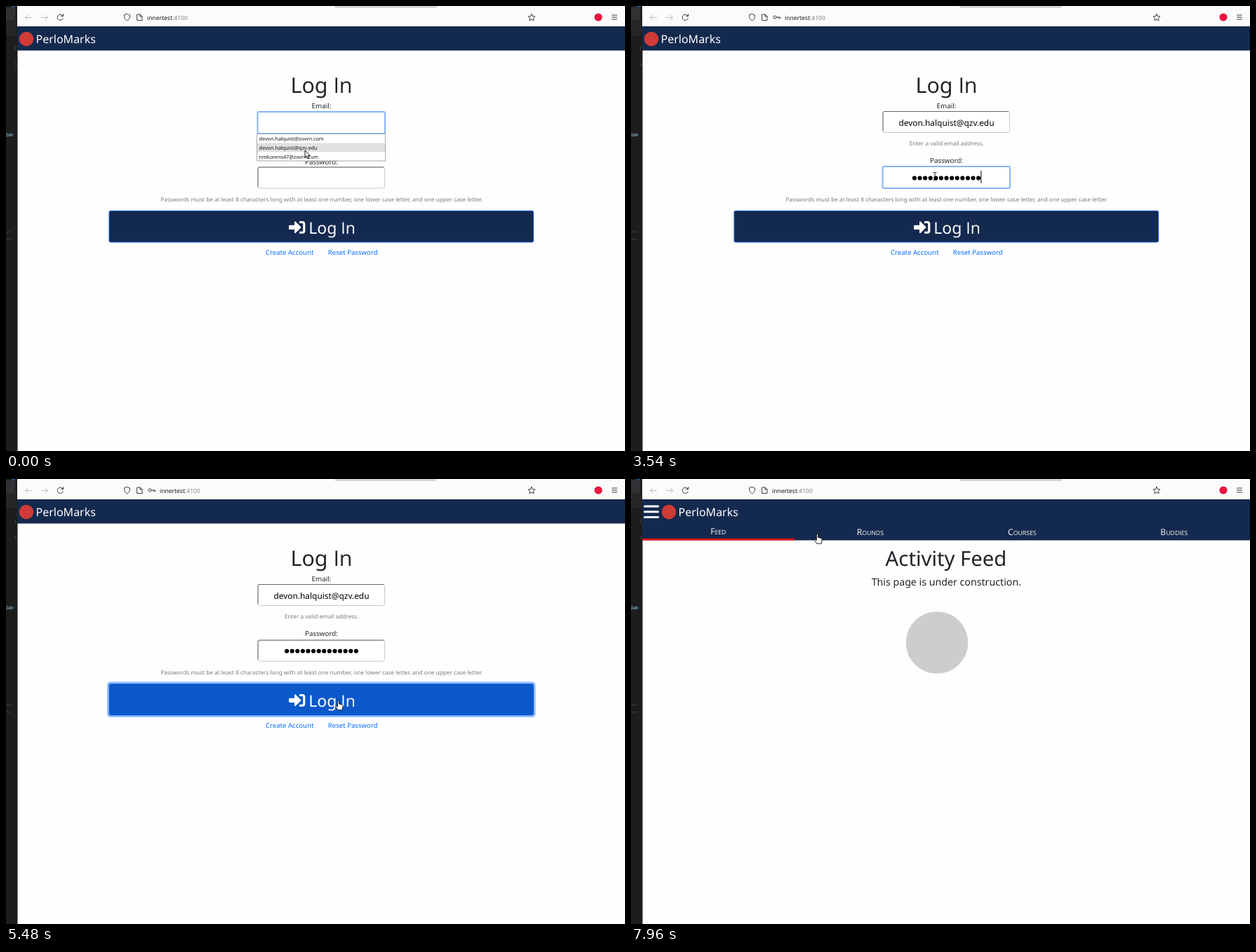
Animation, 882 px wide and 635 px high, one loop 8000 ms. Source, as an HTML page:

```html
<!DOCTYPE html>
<html lang="en">
<head>
<meta charset="utf-8">
<title>Log in</title>
<style>
  html, body { margin: 0; width: 100%; height: 100%; overflow: hidden; background: #fefefe; }
  svg { display: block; }
  text { font-family: "Noto Sans", "Open Sans", sans-serif; fill: #212529; text-rendering: geometricPrecision; }
  .mid { text-anchor: middle; }
  .caps, .open { font-family: "Open Sans", "Noto Sans", sans-serif; }
  .caps { font-size: 12.2px; fill: #fff; text-anchor: middle; }
  .caps tspan { font-size: 8.7px; }
  .h1 { font-size: 30.4px; }
  .label { font-size: 9.8px; }
  .help { font-size: 8.23px; fill: #747c84; }
  .value { font-size: 11.9px; fill: #000; }
  .link { font-size: 9.6px; fill: #0d6efd; }
  .brand { font-size: 16px; fill: #fff; }
  .url { font-size: 8.5px; fill: #15141a; }
  .ui { font-size: 7.25px; fill: #15141a; }
  .key { text-decoration: underline; }
  .navy { fill: #14294e; }
  .line { fill: none; stroke: #3b3b42; stroke-width: 1; stroke-linecap: round; stroke-linejoin: round; }
  .dots { fill: none; stroke: #000; stroke-linecap: round; }
  .pointer { fill: #fff; stroke: #000; stroke-width: .9; stroke-linejoin: round; }
</style>
</head>
<body>
<svg width="882" height="635" viewBox="0 0 882 635">
  <rect width="882" height="635" fill="#fefefe"/>

  <!-- editor edge behind the browser -->
  <rect width="16.5" height="635" fill="#1d1d1d"/>
  <rect y="2" width="13" height="18" fill="#313134"/>
  <rect y="20" width="15" height="22" fill="#262627"/>
  <rect x="8" width="5" height="1.5" fill="#2a5fb0"/>
  <path d="M13.5 57V63M13.5 81V84H16M0 322.5H8M0 332.5H8" fill="none" stroke="#4a4a4a" stroke-width=".8"/>
  <text x="-1" y="186" font-size="8" style="fill:#9cdcfe">oa‹</text>

  <!-- toolbar -->
  <rect x="16" width="866" height="29" fill="#fbfbfc"/>
  <path d="M468.500 0H614V1Q614 3 612 3H470.500Q468.500 3 468.500 1Z" fill="#d6d6d8"/>
  <g class="line">
    <path d="M36.500 16.500H27.500M31 13L27.500 16.500L31 20M50.500 16.500H59.500M56 13L59.500 16.500L56 20" stroke="#bcbcc0"/>
    <path d="M81 14A4.200 4.200 0 1 0 81.300 18M81.700 11.500V14.500H78.700"/>
    <path d="M172.500 11.500L176.500 13Q177 18.500 172.500 21Q168 18.500 168.500 13Z"/>
    <path d="M187 12H191L194 15V20.500H187ZM191 12V15H194"/>
    <path d="M749 11.300L750.500 14.500L754 14.900L751.400 17.200L752.100 20.700L749 19L745.900 20.700L746.600 17.200L744 14.900L747.500 14.500Z"/>
    <path d="M863.500 13H870.500M863.500 16H870.500M863.500 19H870.500"/>
  </g>
  <circle cx="844" cy="16" r="5.600" fill="#e9153f"/>
  <g id="keyIcon">
    <rect id="keyBack" x="199" y="7" width="18" height="18" rx="2" fill="#d4d4dc"/>
    <path class="line" d="M207.200 16A2.100 2.100 0 1 0 203 16A2.100 2.100 0 1 0 207.200 16H212.500V18M210.500 16V17.500"/>
  </g>
  <text id="url" class="url" x="201" y="19.500">innertest<tspan fill="#85858c">:4100</tspan></text>

  <g id="login">
    <rect class="navy" x="16" y="29" width="866" height="34.500"/>
    <circle cx="29" cy="47" r="10.300" fill="#cf3b36"/>
    <text class="brand" x="42.500" y="53">PerloMarks</text>
    <text class="h1 mid" x="449.500" y="124">Log <tspan class="open">In</tspan></text>
    <text class="label mid" x="449.500" y="146">Email:</text>
    <g id="email"></g>
    <text id="emailValue" class="value mid" x="449.500" y="170.500">devon.halquist@qzv.edu</text>
    <text id="emailHelp" class="help mid" x="449.500" y="199">Enter a valid email address.</text>
    <text id="passLabel" class="label mid" x="449.500" y="224">Password:</text>
    <g id="pass"></g>
    <path id="passDots" class="dots" stroke-width="6.200" stroke-dasharray="0 7.600"/>
    <text class="help mid" x="449.500" y="278.500">Passwords must be at least 8 characters long with at least one number, one lower case letter, and one upper case letter.</text>
    <rect id="ring" x="145.200" y="290.500" width="608.100" height="48.300" rx="3.500" fill="none" stroke="#98c1fe" stroke-width="2.600"/>
    <rect id="submit" x="147" y="292.300" width="604.500" height="44.700" rx="2" stroke="#0d5fd9"/>
    <path d="M404 312.700H411V308.300Q411 306.500 412.500 307.600L420 315Q420.700 315.800 420 316.600L412.500 324Q411 325 411 323.300V319H404Q403 319 403 318V313.700Q403 312.700 404 312.700ZM418 307H422.500Q426.300 307 426.300 310.800V321Q426.300 324.800 422.500 324.800H418V321.800H422Q423.200 321.800 423.200 320.600V311.200Q423.200 310 422 310H418Z" fill="#fff"/>
    <text x="431.200" y="324.500" font-size="23" style="fill:#fff">Log <tspan class="open">In</tspan></text>
    <text class="link mid" x="404.200" y="354.700">Create Account</text>
    <text class="link mid" x="494.200" y="354.700">Reset Password</text>
    <g id="list">
      <rect x="357.500" y="182.500" width="183" height="38.500" fill="#fff" stroke="#a9a9ad"/>
      <rect x="358" y="195.500" width="182" height="12.800" fill="#e0e0e1"/>
      <text class="ui" x="360.500" y="192">devon.halquist@zovrn.com</text>
      <text class="ui" x="360.500" y="204.800">devon.halquist@qzv.edu</text>
      <text class="ui" x="360.500" y="217.600">nmkorens47@zovrn.com</text>
    </g>
    <rect id="caret" width="1" height="18"/>
  </g>

  <g id="feed">
    <rect class="navy" x="16" y="29" width="866" height="58.500"/>
    <path d="M19.500 39H38.500M19.500 46.700H38.500M19.500 54.400H38.500" stroke="#fff" stroke-width="3" stroke-linecap="round"/>
    <circle cx="54" cy="47" r="10.300" fill="#cf3b36"/>
    <text class="brand" x="67.500" y="53">PerloMarks</text>
    <g id="tabs"></g>
    <rect x="16" y="85" width="217" height="2.500" fill="#fa0f14"/>
    <text class="mid" x="449" y="123.500" font-size="29.300">Activity Feed</text>
    <text class="mid" x="449.300" y="152" font-size="14.200">This page is under construction.</text>
    <circle cx="436" cy="233.500" r="44.300" fill="#cdcdcd"/>
  </g>

  <g id="popup">
    <rect id="shadow" x="199.500" y="24.500" width="238.500" height="173" rx="3" fill="#000" opacity=".1"/>
    <rect x="200.500" y="25" width="236.500" height="171" rx="3" fill="#fff"/>
    <text class="ui" x="210.700" y="43.800" style="font-size:6.900px;font-weight:700">Save login for http://innertest:4100?</text>
    <text class="ui" x="210.500" y="66.500">Username</text>
    <text class="ui" x="210.500" y="110.700">Password</text>
    <g fill="#fff" stroke="#8f8f9d">
      <rect x="211.500" y="71.500" width="215" height="19.500" rx="2"/>
      <rect x="211.500" y="116" width="215" height="19.500" rx="2"/>
      <rect x="211.500" y="147" width="9.500" height="9.500" rx="1.500" fill="#f0f0f4"/>
    </g>
    <text class="ui" x="216" y="84">devon.halquist@qzv.edu</text>
    <path class="line" d="M413 80.500L415.500 83L418 80.500"/>
    <path class="dots" d="M218.300 126.500H277.800" stroke-width="3.500" stroke-dasharray="0 4.570"/>
    <text class="ui" x="224.700" y="154.700" style="fill:#4b4b53">S<tspan class="key">h</tspan>ow password</text>
    <g id="buttons" fill="#f0f0f4">
      <rect x="309" y="166" width="36" height="20" rx="2"/>
      <rect id="decline" x="350" y="166" width="56" height="20" rx="2"/>
      <rect x="406.700" y="166" width="20.300" height="20" rx="2"/>
    </g>
    <text class="ui mid" x="327" y="178.700"><tspan class="key">S</tspan>ave</text>
    <text class="ui mid" x="378" y="178.700"><tspan class="key">D</tspan>on't save</text>
    <path class="line" d="M413.200 174L416.800 177.500L420.400 174"/>
  </g>

  <g id="cursor">
    <path id="arrow" class="pointer" d="M0 0V10.200L2.400 8L4 11.700L5.700 11L4.200 7.400H7.200Z"/>
    <path id="beam" d="M-2.500 -5.500H-.6L0 -5L.6 -5.500H2.500M0 -5V5M-2.500 5.500H-.6L0 5L.6 5.500H2.500" fill="none" stroke="#222"/>
    <path id="hand" class="pointer" d="M-1.100 .9Q0 -.6 1.100 .9V5L3.400 5.300L6 6.200Q6.900 6.700 6.700 8L5.600 13.700H-.6L-3.900 9Q-4.300 7.700 -3 7.700L-1.100 9Z"/>
  </g>
</svg>
<script>
  const LOOP = 8000;
  const $ = id => document.getElementById(id);
  const show = (id, on) => $(id).setAttribute('visibility', on ? 'inherit' : 'hidden');
  const set = (id, attrs) => { for (const k in attrs) $(id).setAttribute(k, attrs[k]); };
  const within = (t, a, b) => t >= a && t < b;

  // last row whose time has passed
  const at = (rows, t) => rows.filter(r => r[0] <= t).pop();

  const FILL = 720, TO_PASS = 1020, PRESS = 5360, LOGGED_IN = 5490;

  const CURSOR = [
    [0, 'arrow', 426, 206], [870, 'arrow', 429, 222], [1020, 'beam', 435, 243], [1420, 'beam', 433, 243],
    [4720, 'beam', 440, 239], [4840, 'arrow', 464, 265], [4960, 'hand', 479.5, 294.5],
    [5080, 'hand', 473.5, 316], [5490, 'arrow', 473.5, 316],
    [6220, 'arrow', 466, 303], [6360, 'arrow', 438, 258], [6490, 'arrow', 402, 208],
    [6630, 'arrow', 380, 181], [6760, 'arrow', 373.5, 173.5],
    [7050, 'arrow', 372, 158], [7180, 'arrow', 364, 98], [7300, 'arrow', 304, 93],
    [7430, 'arrow', 230, 89], [7560, 'hand', 197.5, 86], [7700, 'hand', 206, 83],
    [7830, 'hand', 237, 80], [7960, 'hand', 265.5, 78.5]
  ];
  const TYPED = [
    [0, 0], [2140, 1], [2420, 2], [2560, 4], [2700, 5], [2840, 7], [2980, 8],
    [3120, 10], [3260, 12], [3540, 13], [3830, 14]
  ];
  const POPUP = [[0, 0], [5630, .5], [5750, 1], [7050, .5], [7180, 0]];
  const CARET = [[130, TO_PASS], [TO_PASS, 1570], [2420, 4290], [4840, PRESS]];
  // the hover colour fades in
  const SUBMIT = [[0, '#14294e'], [4960, '#123264'], [5080, '#0b5ed7'], [PRESS, '#0a58ca']];
  const DECLINE = [[0, '#f0f0f4'], [6630, '#cfcfd8'], [6910, '#b9b9c4']];

  $('tabs').innerHTML = ['Feed', 'Rounds', 'Courses', 'Buddies'].map((name, i) =>
    `<text class="caps" x="${124.3 + i * 216.5}" y="${i ? 80.3 : 79.3}">${name[0]}<tspan>${name.slice(1).toUpperCase()}</tspan></text>`
  ).join('');

  function field(id, bottom, focused) {
    const h = focused ? 31 : 30, y = bottom - h - .5;
    $(id).innerHTML = focused
      ? `<rect x="358.500" y="${y}" width="181.500" height="${h}" rx="2" fill="#fff" stroke="#85b5f5" stroke-width="2"/>`
      : `<rect x="359" y="${y}" width="180.500" height="${h}" rx="2.500" fill="#fff" stroke="#c9c9c9"/>
         <path d="M359 ${y + h - 2}V${y + 2}Q359 ${y} 361 ${y}H538" fill="none" stroke="#666"/>`;
  }

  let lastFocus;
  function focusOn(name) {
    if (name === lastFocus) return;
    lastFocus = name;
    field('email', name === 'email' ? 182.5 : 181, name === 'email');
    field('pass', 260.5, name === 'pass');
    set('passLabel', { y: name === 'email' ? 225.7 : 224 });
  }

  function draw(t) {
    const onFeed = t >= LOGGED_IN;
    show('login', !onFeed);
    show('feed', onFeed);

    focusOn(t < TO_PASS ? 'email' : t < PRESS ? 'pass' : 'submit');
    const filled = t >= FILL;
    show('list', !filled);
    show('emailValue', filled && !onFeed);
    show('emailHelp', filled && !onFeed);

    const typed = at(TYPED, t)[1], half = typed * 3.8;
    show('passDots', typed && !onFeed);
    set('passDots', { d: `M${449.5 - half + 3.8} 245.500h${Math.max(0, typed - 1) * 7.6 + .1}` });
    show('caret', CARET.some(([a, b]) => within(t, a, b)));
    set('caret', t < TO_PASS ? { x: filled ? 518.5 : 449, y: 157 } : { x: 449 + half, y: 235 });
    set('submit', { fill: at(SUBMIT, t)[1] });
    show('ring', within(t, PRESS, LOGGED_IN));

    const hasKey = within(t, 2140, 7050);
    const alpha = at(POPUP, t)[1];
    show('keyIcon', hasKey);
    show('keyBack', hasKey && alpha > 0);
    set('url', { x: hasKey ? 219 : 201 });
    set('popup', { opacity: alpha, transform: `translate(0 ${alpha < 1 ? -1 : 0})` });
    show('shadow', alpha === 1);
    show('buttons', alpha === 1);
    set('decline', { fill: at(DECLINE, t)[1] });

    const [, shape, x, y] = at(CURSOR, t);
    for (const s of ['arrow', 'beam', 'hand']) show(s, s === shape);
    set('cursor', { transform: `translate(${x} ${y})` });
  }

  const start = performance.now();
  function tick() {
    draw((performance.now() - start) % LOOP);
    requestAnimationFrame(tick);
  }
  tick();
</script>
</body>
</html>
```
